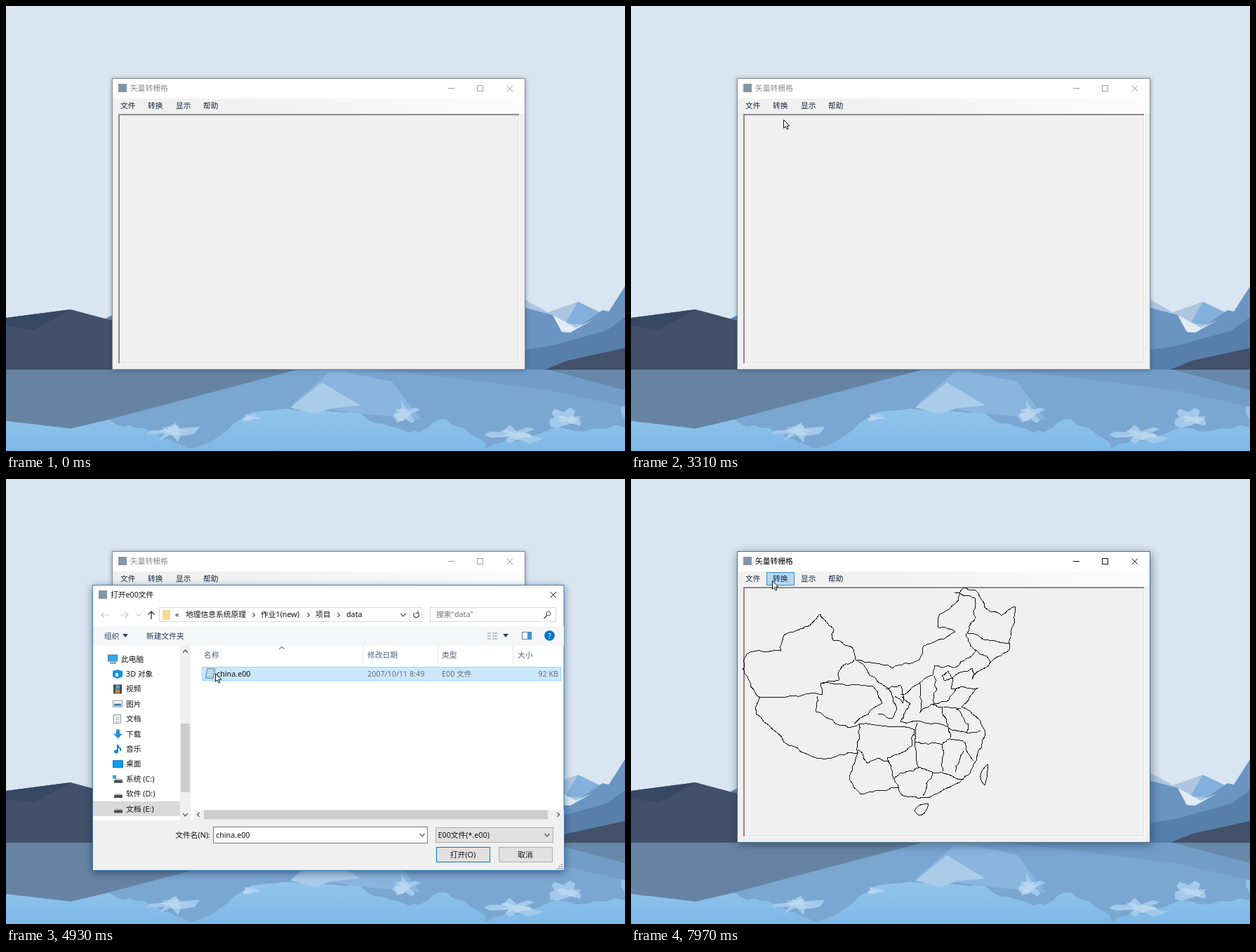
Write an HTML page that moves like this. It is 882x635 px and loops after 8 s.

```html
<!DOCTYPE html>
<html lang="zh">
<head>
<meta charset="utf-8">
<style>
html, body { margin: 0; width: 100%; height: 100%; overflow: hidden; background: #d9e5f0; }
svg { display: block; width: 882px; height: 635px; }
text { font: 10.75px "Noto Sans", "Noto Sans CJK SC", sans-serif; fill: #111; white-space: pre; }
.crisp { shape-rendering: crispEdges; }
#frame { stroke: #858c92; filter: drop-shadow(0 1px 3px rgba(30,50,80,.45)); }
#main.active #frame { stroke: #4d7383; filter: drop-shadow(1px 3px 7px rgba(30,50,80,.55)); }
#title { fill: #8c8c8c; }
#main.active #title { fill: #000; }
#buttons { stroke: #999; }
#main.active #buttons { stroke: #111; }
#dialogFrame { filter: drop-shadow(0 3px 6px rgba(20,40,70,.55)); }
#dialog { transform-origin: 460px 355px; }
.menu { filter: drop-shadow(3px 3px 1px rgba(40,40,40,.55)); }
.bar text { fill: #15273f; }
</style>
</head>
<body>
<svg id="stage" viewBox="0 0 882 635"></svg>
<script>
const LOOP = 8000;
let seed = 17;
const random = () => (seed = seed * 16807 % 2147483647) / 2147483647 - .5;

const rect = (x, y, w, h, fill, stroke = 'none', extra = '') =>
  `<rect x="${x}" y="${y}" width="${w}" height="${h}" fill="${fill}" stroke="${stroke}" ${extra}/>`;
const poly = (points, fill, extra = '') => `<polygon points="${points}" fill="${fill}" ${extra}/>`;
const line = (d, stroke, width = 1, extra = '') =>
  `<path d="${d}" fill="none" stroke="${stroke}" stroke-width="${width}" ${extra}/>`;
const text = (x, y, s, fill = '', extra = '') =>
  `<text x="${x}" y="${y}" ${fill && `style="fill:${fill}"`} ${extra}>${s}</text>`;
const group = (id, body) => `<g id="${id}">${body}</g>`;
const chevronX = (x, y, d) => line(`M${x - d} ${y - 3}L${x + d} ${y}L${x - d} ${y + 3}`, '#555', 1.2);
const chevronY = (x, y, d, color = '#555') => line(`M${x - 3.5} ${y - d}L${x} ${y + d}L${x + 3.5} ${y - d}`, color, 1.2);
const arrowDown = (x, y) => poly(`${x - 4},${y} ${x + 4},${y} ${x},${y + 5}`, '#263f5f');
const columns = (xs, y, h, color) => line(xs.map(x => `M${x} ${y}v${h}`).join(''), color);
const rows = (x, w, ys, color) => line(ys.map(y => `M${x} ${y}h${w}`).join(''), color);

// Midpoint displacement turns a few anchors into a ragged edge.
function ragged(anchors, bump) {
  let points = anchors.split(' ').map(p => p.split(',').map(Number));
  for (let level = 0; level < 3; level++) {
    points = points.flatMap(([x, y], i) => {
      if (!i) return [[x, y]];
      const [px, py] = points[i - 1], dx = x - px, dy = y - py, length = Math.hypot(dx, dy);
      if (length < 5) return [[x, y]];
      const k = random() * Math.min(.35, bump / length);
      return [[(x + px) / 2 + dy * k, (y + py) / 2 - dx * k], [x, y]];
    });
  }
  return points.map(p => p.map(n => n.toFixed(1)));
}

// Ragged patch of snow: a ring of points with random radii.
function snow(cx, cy, rx, ry) {
  const ring = (scale, fill) => poly(Array.from({ length: 18 }, (_, i) => {
    const angle = i * Math.PI / 9, r = scale * (.65 + random() * .8);
    return `${cx + rx * r * Math.cos(angle)},${cy + ry * r * Math.sin(angle)}`;
  }).join(' '), fill);
  return ring(1, '#a3c9ea') + ring(.6, '#b9d6ee');
}

function landscape() {
  return [
    `<defs><linearGradient id="water" x1="0" y1="0" x2="0" y2="1">
      <stop offset="0" stop-color="#82b3df"/><stop offset=".5" stop-color="#91c4ec"/><stop offset="1" stop-color="#7db8e8"/>
    </linearGradient><linearGradient id="menuBar"><stop offset="0" stop-color="#f0f0f0"/><stop offset=".4" stop-color="#f2f2f2"/>
      <stop offset="1" stop-color="#fdfdfd"/></linearGradient></defs>`,
    rect(0, 0, 882, 520, '#d9e5f0'),
    poly('138,448 152,441 152,460', '#6089b7'),
    poly('0,445 92,433 152,449 152,519 0,519', '#42506a'),
    poly('0,445 92,433 40,462 0,456', '#374865'),
    poly('738,418 772,437 815,422 846,437 846,519 738,519', '#adc5df'),
    poly('815,422 846,437 832,455 797,453', '#83b0dc'),
    poly('738,430 779,441 792,465 804,466 850,434 859,436 882,400 882,519 738,519', '#6a94c1'),
    poly('779,441 812,459 836,448 804,466 792,465', '#e2eaf4'),
    poly('738,491 777,485 856,463 882,444 882,519 738,519', '#577fac'),
    poly('768,519 800,506 882,488 882,519', '#43516a'),
    rect(0, 519, 882, 116, 'url(#water)'),
    poly(ragged('0,519 882,519 882,601 770,606 685,632 628,590 574,609 500,578 365,578 265,632 215,606 138,590 0,592', 9).join(' '), '#7aa6d2'),
    poly('465,519 408,568 500,581 591,590 550,536', '#89b5de'),
    poly('540,519 882,519 882,572 774,548', '#719dc8'),
    poly('772,519 882,519 882,548', '#6788a8'),
    poly('0,519 415,519 139,592 92,603 0,592', '#6684a2'),
    poly('450,537 505,570 464,574 440,582 405,573', '#abcce8'),
    snow(238, 606, 40, 16), snow(347, 588, 22, 8), snow(568, 582, 28, 20),
    snow(725, 612, 44, 15), snow(798, 590, 32, 17)
  ].join('');
}

const outline = '162,264 165,250 213,245 218,223 236,216 255,209 270,193 288,213 288,230 317,243 320,258 372,270 411,258 417,238 462,218 437,211 440,193 458,180 473,156 490,158 503,181 528,195 548,183 540,240 512,262 486,286 486,270 458,284 456,299 495,298 471,325 499,350 505,364 492,402 474,427 417,455 388,452 381,440 346,446 327,450 312,430 323,391 272,399 225,380 178,335 184,312 162,278 162,264';
const westBorders = ['184,311 272,308 270,292 296,287 297,273 318,258', '265,310 264,332 310,355 325,350 323,391',
  '270,292 345,296 358,320 318,350', '322,258 340,280 362,296 378,325 373,341 352,335',
  '325,350 404,358 400,381 365,398 374,428', '363,300 383,294 387,320 376,310', '323,386 337,406 353,398 368,402'];
const northBorders = ['384,308 430,280 433,266 464,268 492,245 477,222 490,200 490,170 461,163', '480,221 540,235', '492,244 512,262',
  '386,310 398,320 384,346 452,354 444,326 430,322', '411,290 412,333 431,321 436,300 432,281',
  '430,322 447,318 468,298', '443,281 452,274 458,284 446,287 443,281'];
const southBorders = ['445,326 470,328', '452,355 478,362 481,350 463,328', '478,362 498,360', '408,348 405,376 443,379 455,370 452,356',
  '455,371 473,374 488,402', '474,388 462,418', '443,379 444,417', '405,376 410,412 430,419 474,428', '410,412 376,426 381,440', '430,419 416,452'];

const drawMap = () => group('map', line([outline, ...westBorders, ...northBorders, ...southBorders]
  .map(s => 'M' + ragged(s, 5).join('L')).join('')
  + 'M404 474Q408 462 424 464Q420 480 410 480ZM508 407Q509 424 504 437Q490 424 508 407Z', '#111', 1, 'class="crisp"'));

const menuLeft = i => Math.round(155 + 39.3 * i);
const menuTitles = ['文件', '转换', '显示', '帮助'];
const appIcon = (x, y) => rect(x, y, 12, 12, '#8496a8');

function dropdown(id, x, width, items) {
  return group(id, `<g class="menu">${rect(x + .5, 151.5, width, 4 + 20 * items.length, '#f2f2f2', '#8a8f94')}</g>`
    + rect(x + .5, 133.5, 38, 18, '#f4f4f4', '#858b90') + rect(x + 1, 151, 37, 2, '#f4f4f4')
    + rect(x + 2.5, 153.5, width - 4, 19, '#b5d7f2', '#3c8fd3', `id="${id}Hot"`)
    + items.map((s, i) => text(x + 32, 166 + i * 20, s)).join(''));
}

function mainWindow() {
  const inherit = 'style="stroke:inherit"';
  return group('main', [
    rect(151.5, 103.5, 588, 415, '#f0f0f0', '', 'id="frame"'),
    rect(152, 104, 587, 28, '#fff'), rect(152, 132, 587, 21, 'url(#menuBar)'),
    appIcon(160, 111), text(177, 121, '矢量转栅格', '', 'id="title"'),
    group('buttons', line('M630 117.5H639M671.5 113.5h8v8h-8Z', '', 1, inherit) + line('M713.5 113.5l8.5 8.5m0-8.5l-8.5 8.5', '', 1, inherit)),
    line('M161 510V155H731', '#8b8b8b', 2, 'class="crisp"'),
    line('M162 509.5H730.5V156', '#e1e1e1'), line('M161 510.5H731.5V154', '#fff'),
    drawMap(),
    rect(0, 133.5, 39, 18, '#b3d7f3', '#3f86c4', 'id="hotTitle"'),
    dropdown('fileMenu', menuLeft(0), 133, ['打开e00文件', '保存文件', '退出']),
    dropdown('convertMenu', menuLeft(1), 121, ['矢量转栅格']),
    `<g class="bar">${menuTitles.map((s, i) => text(menuLeft(i) + 8, 146, s)).join('')}</g>`
  ].join(''));
}

// Sidebar icons are drawn around the left middle of their cell.
const drive = rect(3, 0, 10, 3, '#b8bcc0') + rect(2, 2, 12, 4, '#4a4d50');
const places = [
  ['此电脑', rect(-6.5, -5.5, 13, 9, '#35a4ea', '#4d7ea3') + rect(-4, 5, 9, 2, '#6b8798')],
  ['3D 对象', poly('0,-4 7,-6 14,-4 14,4 7,7 0,4', '#1592d8') + rect(4, -1, 4, 5, '#d7effb')],
  ['视频', rect(1, -6, 12, 13, '#454b50') + rect(4, -5, 6, 5, '#4b9cd0') + rect(4, 1, 6, 5, '#c98b4c')],
  ['图片', rect(.5, -4.5, 13, 9, '#eaf5fb', '#8c989f') + rect(2, 0, 10, 3, '#397eaa')],
  ['文档', rect(1.5, -5.5, 10, 12, '#fff', '#8a959e') + rows(4, 5, [-2, 1, 4], '#5b9bc8')],
  ['下载', rect(5, -6, 5, 7, '#2f8fdb') + poly('1,0 14,0 7.5,7', '#2f8fdb')],
  ['音乐', line('M7 4V-6Q8 -2 11 0V3', '#1683d8', 2) + '<ellipse cx="5" cy="4" rx="3" ry="2.5" fill="#1683d8"/>'],
  ['桌面', rect(.5, -4.5, 14, 10, '#109cf0', '#1576bb')],
  ['系统 (C:)', drive + rect(0, -5, 5, 5, '#2ba0e4')],
  ['软件 (D:)', drive],
  ['文档 (E:)', drive]
];
const place = ([name, icon], i) => {
  const y = 256.5 + 21.4 * i;
  return `<g transform="translate(152 ${y})">${icon}</g>` + text(i ? 171 : 164, y + 4, name);
};

function fileDialog() {
  const muted = '#6d6d6d', head = '#4c607a', middle = 'text-anchor="middle"', end = 'text-anchor="end"';
  return group('dialog', [
    rect(123.5, 151.5, 671.5, 407, '#fff', '#3c80b4', 'id="dialogFrame"'),
    appIcon(132, 159), text(149, 169, '打开e00文件'), line('M775.5 161l8.5 8.5m0-8.5l-8.5 8.5', '#111'),
    line('M147 194h-11m4-4l-4 4l4 4M163 194h11m-4-4l4 4l-4 4', '#c5c9cc', 1.2),
    chevronY(189, 194, 1.5, '#c5c9cc'), line('M207 200v-11m-4.5 4.5l4.5-4.5l4.5 4.5', '#444', 1.5),
    rect(218.5, 183.5, 374, 20, '#fff', '#d9d9d9'), rect(223, 187, 11, 14, '#f6d98a'),
    text(241, 197, '«'), text(256, 197, '地理信息系统原理'), text(363, 197, '作业1(new)'), text(441, 197, '项目'), text(485, 197, 'data'),
    ...[353, 431, 474].map(x => chevronX(x, 194, 1.5)), chevronY(566, 194, 2), columns([575.5], 184, 19, '#d9d9d9'),
    line('M587 191A3.8 3.8 0 1 1 582 191M587 188v3.5h-3.5', '#444', 1.2),
    rect(604.5, 183.5, 179, 20, '#fff', '#d9d9d9'), text(613, 197, '搜索"data"', muted),
    '<circle cx="773" cy="192" r="3" fill="none" stroke="#444"/>', line('M771 194.5l-4.5 4.5', '#444', 1.4),
    rect(124, 210, 671, 28, '#f5f6f7'), text(140, 228, '组织', '#263f5f'), text(200, 228, '新建文件夹', '#263f5f'),
    arrowDown(170, 221), arrowDown(712, 221),
    rows(686, 5, [220, 224, 228], '#7f8c98'), rows(693, 7, [220, 224, 228], '#7f8c98'),
    rect(735.5, 218.5, 13, 10, '#fff', '#687f92'), rect(743, 219, 5, 9, '#3b98d7'),
    '<circle cx="774.5" cy="223.5" r="7.3" fill="#0873c4"/>', text(774.5, 227.5, '?', '#fff', middle + ' font-weight="bold"'),
    rect(124, 460, 124, 21, '#d9d9d9'), ...places.map(place),
    rect(248, 238, 15, 249, '#f0f0f0'), rect(249, 349, 13, 98, '#cdcdcd'), chevronY(255.5, 246, -2), chevronY(255.5, 479, 2),
    text(282, 255, '名称', head), text(515, 255, '修改日期', head), text(621, 255, '类型', head), text(729, 255, '大小', head),
    columns([508.5, 615.5, 722.5], 238, 26, '#e3e3e3'), chevronY(393, 241, -1.5, '#777'),
    rect(279.5, 268.5, 511, 19, '', '', 'id="row"'),
    poly('287,270 298,271 295,285 284,284', '#a6d0e8', 'stroke="#678ba2"'), rows(287, 7, [273.5, 276.5, 279.5], '#eaf5fb'),
    text(300, 281.5, 'china.e00'), text(515, 281.5, '2007/10/11 8:49', muted), text(621, 281.5, 'E00 文件', muted),
    text(787, 281.5, '92 KB', muted, end),
    rect(267, 472, 528, 15, '#f0f0f0'), rect(282, 472.5, 490, 13, '#cdcdcd'), chevronX(274, 479, -1.5), chevronX(787, 479, 1.5),
    rect(124, 487, 671, 71, '#f0f0f0'), text(291, 511.5, '文件名(N):', '', end),
    rect(295.5, 496.5, 305, 23, '#fff', '', 'id="nameBox"'), text(299, 512, 'china.e00', '', 'id="fileName"'),
    group('caret', columns([299.5], 501, 15, '#000')), chevronY(593, 508, 2),
    rect(612.5, 497.5, 167, 21, '', '', 'id="filter"'), text(615.5, 512, 'E00文件(*.e00)'), chevronY(771, 508, 2),
    rect(613.5, 525.5, 76, 21, '', '', 'id="open"'), text(651, 539.5, '打开(O)', '', middle),
    rect(702.5, 525.5, 76, 21, '#e1e1e1', '#adadad'), text(740, 539.5, '取消', '', middle),
    line('M785 556h8m-5-3h5m-2-3h2', '#aaa', 2, 'stroke-dasharray="2 1"')
  ].join(''));
}

const pointer = group('cursor', '<path d="M.5 .5V12.3L3.2 9.8L5.1 14L7 13.2L5.2 9.1H8.9Z" fill="#fff" stroke="#111"/>');
document.getElementById('stage').innerHTML = landscape() + mainWindow() + fileDialog() + pointer;
const el = Object.fromEntries([...document.querySelectorAll('[id]')].map(e => [e.id, e]));

// Pointer moves: start, end, x and y reached; it rests in between.
const moves = [
  [0, 290, 758, 590], [290, 1080, 174, 145], [1930, 2230, 219, 154], [2310, 2460, 186, 146], [2460, 2680, 217, 162],
  [3620, 3950, 320, 324], [3950, 4320, 302, 284], [4400, 4560, 298, 277], [5100, 5890, 650, 537], [6100, 6200, 650, 534],
  [6830, 7600, 209, 188], [7660, 7820, 180, 146], [7820, 7970, 201, 145]
];
const STEP = 75;

function pointerAt(t) {
  const i = moves.findLastIndex(m => t >= m[0]);
  const [from, to, x, y] = moves[i], [, , px, py] = moves[Math.max(0, i - 1)];
  const steps = Math.round((to - from) / STEP);
  const p = Math.min(1, Math.floor((t - from) / (to - from) * steps) / steps);
  const eased = (1 - Math.cos(Math.PI * p)) / 2;
  return [px + (x - px) * eased, py + (y - py) * eased].map(Math.round);
}

const within = (v, a, b) => v >= a && v < b;
const show = (e, on) => e.style.display = on ? '' : 'none';
const paint = (e, fill, stroke, width = 1) => {
  e.setAttribute('fill', fill);
  e.setAttribute('stroke', stroke);
  e.setAttribute('stroke-width', width);
};

function render(t) {
  const [x, y] = pointerAt(t);
  show(el.cursor, t >= 290);
  el.cursor.setAttribute('transform', `translate(${x} ${y})`);
  el.main.classList.toggle('active', within(t, 1240, 2930) || t >= 6180);

  const fileOpen = within(t, 1540, 2080) || within(t, 2460, 2850);
  const convertOpen = within(t, 2080, 2460);
  const hot = within(y, 133, 152) ? menuTitles.findIndex((_, i) => within(x, menuLeft(i), menuLeft(i + 1))) : -1;
  const overItem = within(y, 153, 174);
  show(el.fileMenu, fileOpen);
  show(el.convertMenu, convertOpen);
  show(el.fileMenuHot, overItem);
  show(el.convertMenuHot, overItem);
  show(el.hotTitle, hot >= 0 && !fileOpen && !convertOpen);
  el.hotTitle.setAttribute('x', menuLeft(hot) - .5);
  show(el.map, t >= 6260);

  const opacity = t < 3620 ? .45 : t < 3700 ? .85 : t < 6040 ? 1 : .4;
  show(el.dialog, within(t, 3540, 6120));
  el.dialog.style.opacity = opacity;
  el.dialog.style.transform = `scale(${.94 + .06 * opacity})`;

  const chosen = t >= 4720, filterHot = t >= 5660;
  const overOpen = within(x, 613, 690) && within(y, 525, 547);
  show(el.row, chosen || (within(y, 268, 288) && within(x, 279, 792)));
  paint(el.row, chosen ? '#cce8ff' : '#e5f3ff', chosen ? '#99d1ff' : '#e5f3ff');
  show(el.fileName, chosen);
  show(el.caret, !chosen);
  paint(el.nameBox, '#fff', chosen ? '#7a7a7a' : '#0078d7');
  paint(el.filter, filterHot ? '#cfe4f5' : '#e1e1e1', filterHot ? '#75a9cf' : '#adadad');
  paint(el.open, overOpen ? '#e5f1fb' : '#e1e1e1', '#0078d7', overOpen || chosen ? 1 : 2);
}

const start = performance.now();
function tick() {
  render((performance.now() - start) % LOOP);
  requestAnimationFrame(tick);
}
tick();
</script>
</body>
</html>
```
